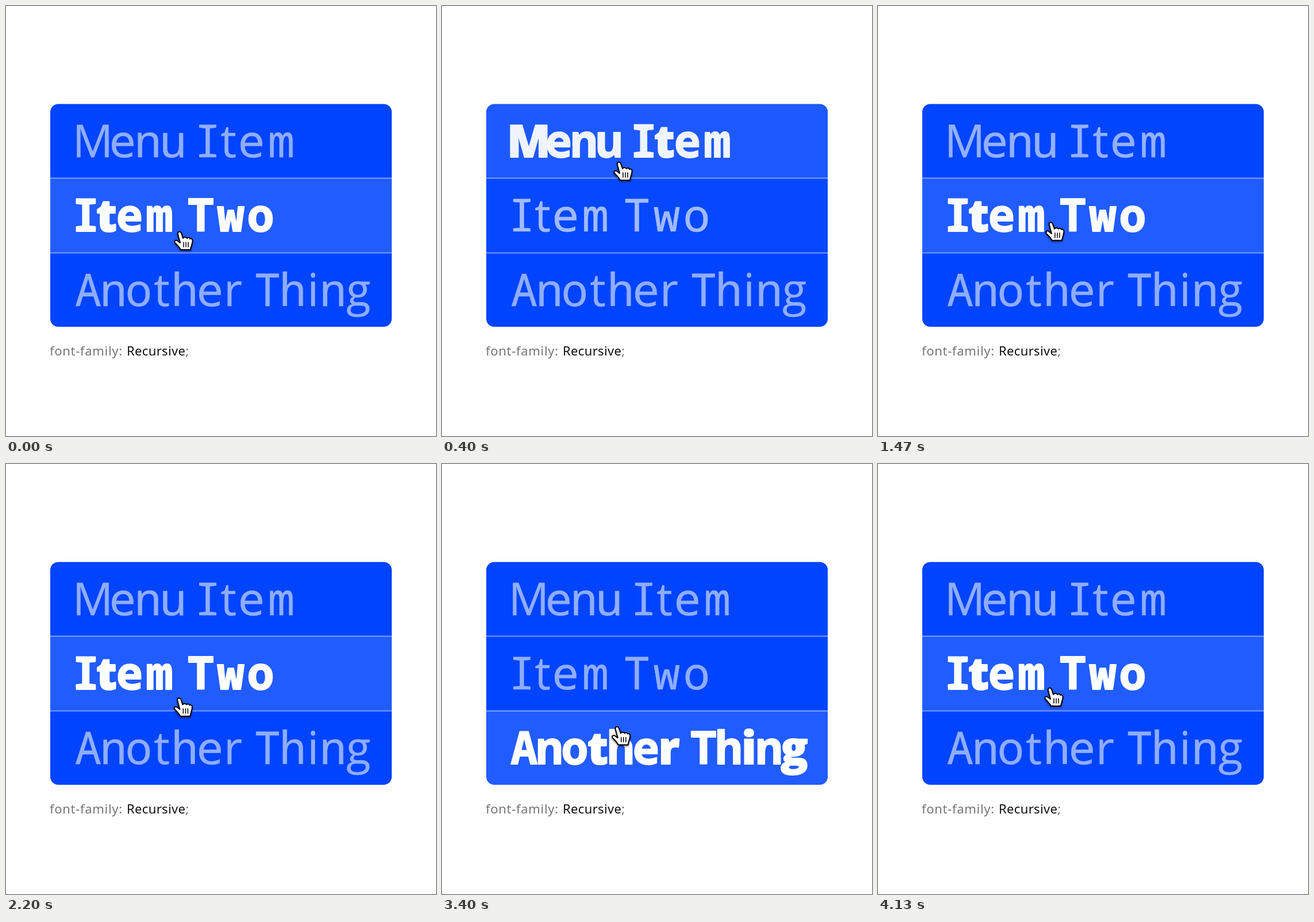
Animation of 748 by 748 pixels, one loop 4190 ms. Source, as an HTML page:

```html
<!DOCTYPE html>
<html lang="en">
<head>
<meta charset="utf-8">
<title>Menu hover</title>
<style>
  html, body { margin: 0; width: 100%; height: 100%; overflow: hidden; background: #fefdff; }
  svg { display: block; width: 100vw; height: 100vh; }
  .label {
    font: 400 78px "Noto Sans Mono", monospace;
    text-anchor: middle;
    fill: #fff;
    stroke: #fff;
    stroke-linejoin: round;
  }
  .label .sans { font-family: "Open Sans", sans-serif; }
  .caption { font: 300 22px "Noto Sans", sans-serif; letter-spacing: .7px; fill: #777; }
  .caption .value { letter-spacing: .35px; fill: #111; }
  #hand { filter: drop-shadow(0 2px 1.5px rgba(0, 0, 0, .5)); }
</style>
</head>
<body>
<svg viewBox="0 0 748 748">
  <clipPath id="card"><rect x="77" y="170.5" width="594" height="387.5" rx="14"/></clipPath>
  <g clip-path="url(#card)">
    <rect x="77" y="170" width="594" height="388" fill="#04f"/>
    <g id="glows" fill="#fff"></g>
    <path d="M77 299.5H671M77 429.5H671" stroke="#fff" stroke-opacity=".45" stroke-width="2"/>
  </g>
  <g id="labels"></g>
  <text class="caption" x="76" y="607.5">font-family: <tspan class="value" x="210">Recursive</tspan>;</text>
  <g id="hand" stroke="#000" stroke-linecap="round" stroke-linejoin="round">
    <path fill="#fff" stroke-width="2" d="M-10-12C-11-17-6-18-4-14L-1-5C1-8 5-7 6-5C8-7 11-6 11-4C13-5 16-4 15.5 0C15 6 13 8 12 15L-5 15C-8 9-12 6-15 3C-17-1-13-3-10 0L-6 3Z"/>
    <path fill="none" stroke-width="1.5" d="M0 2V10M4 2V10M8 2V10"/>
  </g>
</svg>
<script>
const LOOP = 4190, FRAME = LOOP / 63, FADE = 350;
const LEFT = 121, TOP = 170, ROW_HEIGHT = 129.5;

// Each move takes the pointer to a spot and lights a row on the way.
const moves = [
  { start: -LOOP, end: -1, x: 309, y: 409, row: 1, lit: -LOOP },
  { start: 0, end: 400, x: 315, y: 288, row: 0, lit: 180 },
  { start: 1110, end: 1640, x: 307, y: 406, row: 1, lit: 1180 },
  { start: 2150, end: 2720, x: 316, y: 523, row: 2, lit: 2250 },
  { start: 3180, end: 4060, x: 306, y: 406, row: 1, lit: 3560 }
];

const mix = (a, b, p) => a + (b - a) * p;
const easeOut = p => 1 - (1 - Math.min(1, Math.max(0, p))) ** 2;
const byId = id => document.getElementById(id);

function add(parent, name, attributes) {
  const node = document.createElementNS("http://www.w3.org/2000/svg", name);
  for (const key in attributes) node.setAttribute(key, attributes[key]);
  return parent.appendChild(node);
}

// A letter keeps its advance at every weight.
function advance(letter) {
  if (letter === " ") return 20;
  if (letter === "i") return 26;
  if ("Mmw".includes(letter)) return 60;
  return "Itr".includes(letter) ? 36 : 44;
}

function addLabel(text, row) {
  const label = add(byId("labels"), "text", { class: "label", y: TOP + 92.5 + row * ROW_HEIGHT });
  let x = LEFT;
  for (const letter of text) {
    const width = advance(letter);
    const face = "Mtrig".includes(letter) ? "sans" : "mono";
    add(label, "tspan", { x: x + width / 2, class: face }).textContent = letter;
    x += width;
  }
  return label;
}

const rows = ["Menu Item", "Item Two", "Another Thing"].map((text, row) => ({
  label: addLabel(text, row),
  glow: add(byId("glows"), "rect", { x: 77, y: TOP + row * ROW_HEIGHT, width: 594, height: ROW_HEIGHT })
}));

function pointerAt(t) {
  const i = moves.findLastIndex(move => move.start <= t);
  const to = moves[i], from = moves[i - 1] || to;
  const p = easeOut((t - to.start) / (to.end - to.start));
  return [mix(from.x, to.x, p), mix(from.y, to.y, p)];
}

function litLevel(row, t) {
  const i = moves.findLastIndex(move => move.lit <= t);
  const p = easeOut((t - moves[i].lit) / FADE);
  if (moves[i].row === row) return p;
  return moves[i - 1]?.row === row ? 1 - p : 0;
}

function draw(now) {
  const t = Math.floor((now % LOOP) / FRAME) * FRAME;
  rows.forEach(({ label, glow }, row) => {
    const level = litLevel(row, t);
    glow.style.opacity = .13 * level;
    Object.assign(label.style, {
      opacity: mix(.56, 1, level),
      fontWeight: Math.round(mix(400, 850, level)),
      strokeWidth: mix(.4, 2, level) + "px"
    });
  });
  byId("hand").setAttribute("transform", `translate(${pointerAt(t)})`);
}

const start = performance.now();
function tick() {
  draw(performance.now() - start);
  requestAnimationFrame(tick);
}
tick();
</script>
</body>
</html>
```
